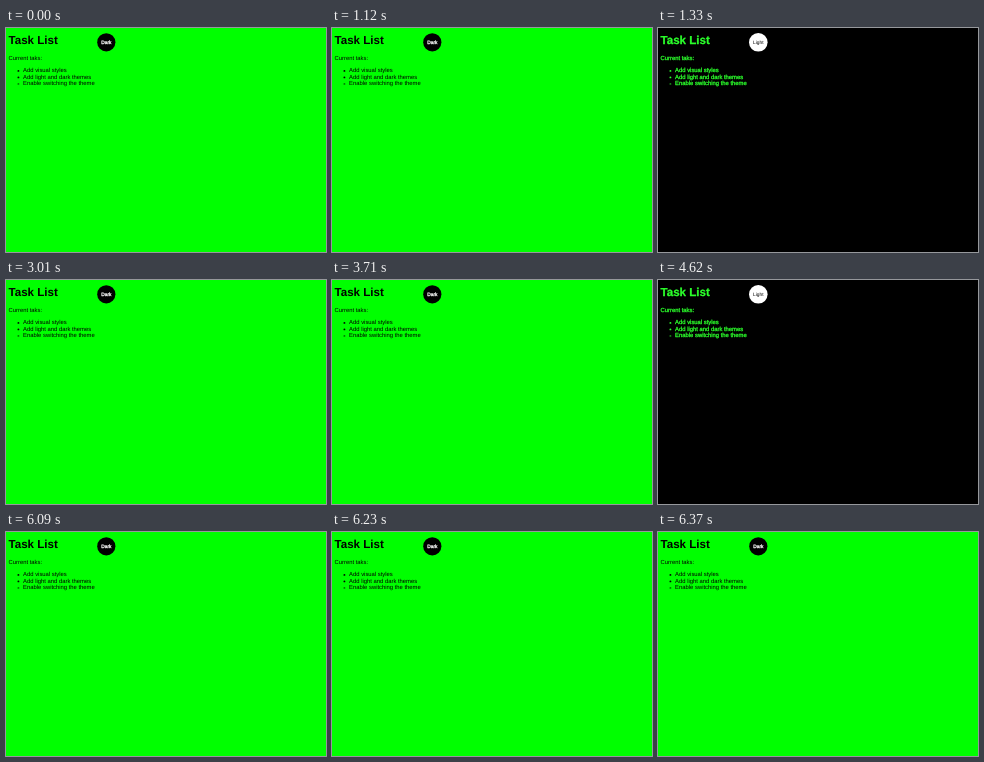
These frames come from a looping animation (320x224 px, 6650 ms). An HTML page with a canvas:

```html
<!DOCTYPE html>
<html lang="en">
<head>
<meta charset="utf-8">
<title>Task List</title>
<style>
  html, body { margin: 0; width: 100%; height: 100%; overflow: hidden; background: #0f0; }
  canvas { display: block; width: 320px; height: 224px; }
</style>
</head>
<body>
<canvas id="stage" width="320" height="224"></canvas>
<script>
const ctx = document.getElementById('stage').getContext('2d');
const FAMILY = '"Liberation Sans", Arial, sans-serif';
const LOOP = 6650;
const DARK_SPANS = [[1330, 3010], [4620, 6090]];
const TASKS = ['Add visual styles', 'Add light and dark themes', 'Enable switching the theme'];
// Light text on a dark ground looks heavier, so it gets a thin outline.
const LIGHT = {
  page: '#0f0', ink: '#000', inkEdge: 0,
  button: '#000', radius: 9.1, label: '#fff', labelEdge: 0.3, name: 'Dark'
};
const DARK = {
  page: '#000', ink: '#2bff2b', inkEdge: 0.3,
  button: '#fff', radius: 9.3, label: '#000', labelEdge: 0, name: 'Light'
};

ctx.textRendering = 'geometricPrecision';
ctx.lineJoin = 'round';

function text(str, x, y, size, color, edge, weight = 'normal', align = 'left') {
  ctx.font = `${weight} ${size}px ${FAMILY}`;
  ctx.textAlign = align;
  ctx.fillStyle = ctx.strokeStyle = color;
  ctx.fillText(str, x, y);
  if (edge) {
    ctx.lineWidth = edge;
    ctx.strokeText(str, x, y);
  }
}

function disc(x, y, radius, color) {
  ctx.fillStyle = color;
  ctx.beginPath();
  ctx.arc(x, y, radius, 0, Math.PI * 2);
  ctx.fill();
}

function draw(theme) {
  const { ink, inkEdge } = theme;
  ctx.fillStyle = theme.page;
  ctx.fillRect(0, 0, 320, 224);

  text('Task List', 2.5, 16.3 - 0.5, 11.6, ink, inkEdge, 'bold');
  text('Current taks:', 2.5, 32.2, 5.87, ink, inkEdge);

  TASKS.forEach((task, i) => {
    const y = 44.4 + i * 6.5;
    ctx.globalAlpha = i === 2 ? 0.55 : 1;
    disc(12.4, y - 1.5, 0.95, ink);
    ctx.globalAlpha = 1;
    text(task, 17.1, y, 5.87, ink, inkEdge);
  });

  disc(100.3, 14.3, theme.radius, theme.button);
  text(theme.name, 100.3, 16.1, 4.83, theme.label, theme.labelEdge, 'normal', 'center');
}

function tick() {
  const t = performance.now() % LOOP;
  const dark = DARK_SPANS.some(([from, to]) => t >= from && t < to);
  draw(dark ? DARK : LIGHT);
  requestAnimationFrame(tick);
}
tick();
</script>
</body>
</html>
```
